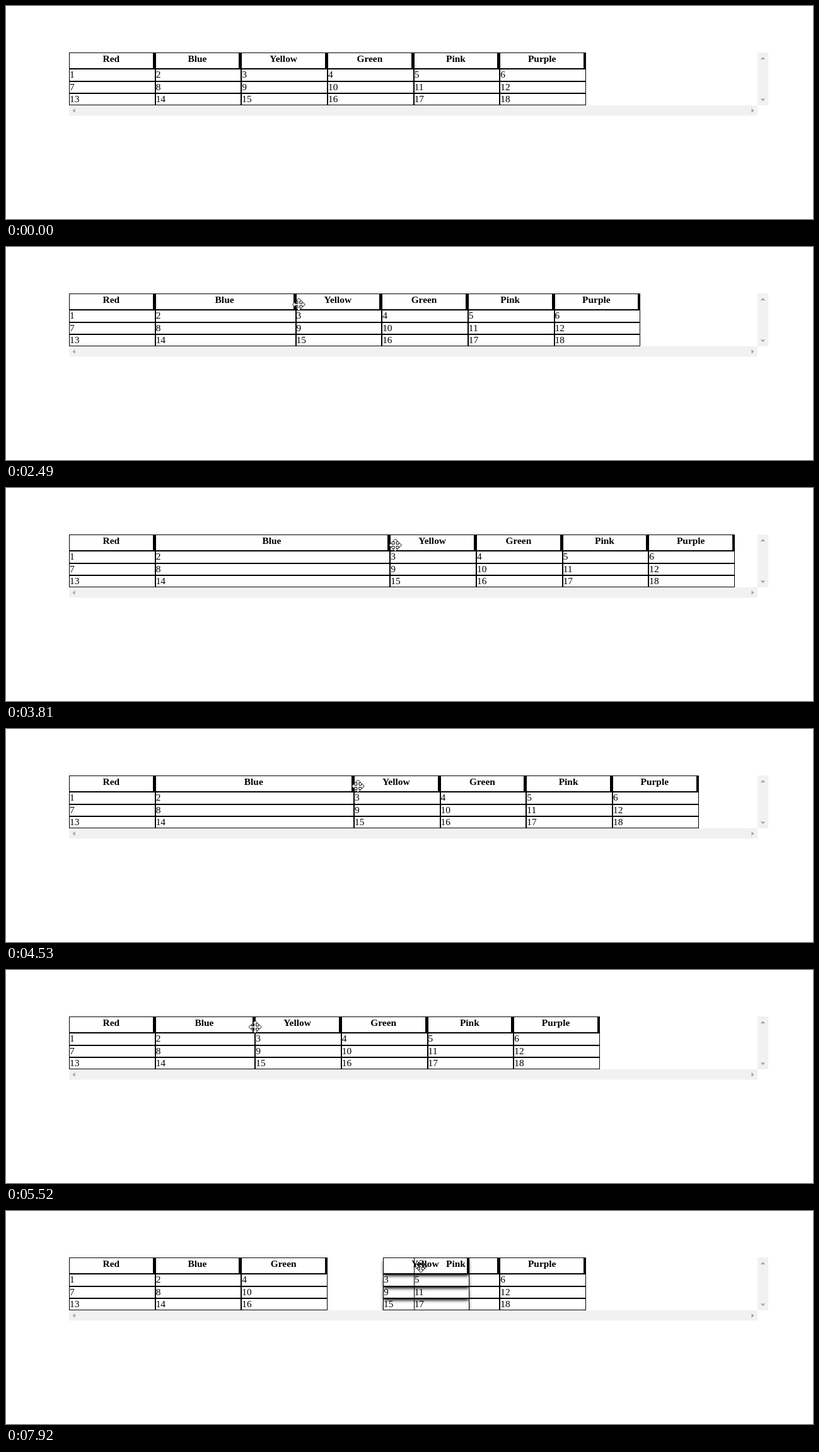
Write an HTML page that moves like this. It is 1280 by 339 pixels and loops after 8 s.

```html
<!DOCTYPE html>
<html lang="en">
<head>
<meta charset="utf-8">
<title>Resizable, sortable columns</title>
<style>
  html, body { margin: 0; width: 100%; height: 100%; overflow: hidden; background: #fff; }
  #view {
    position: absolute; left: 100px; top: 74px; width: 1092px; height: 84px; overflow: hidden;
    font: 15.4px/16px "Liberation Serif", "Times New Roman", serif; color: #000;
  }
  .col { position: absolute; top: 0; height: 84px; }
  .cell {
    position: absolute; left: 0; width: 100%; height: 19.2px;
    box-sizing: border-box; border: 1px solid #000; white-space: nowrap;
  }
  .head {
    top: 0; height: 26.4px; padding-top: .5px; border-right-width: 4px;
    font-weight: bold; text-align: center;
  }
  .dragged { z-index: 1; }
  .dragged .cell { box-shadow: 0 4px 5px -1px #000; }
  svg { position: absolute; left: 0; top: 0; }
</style>
</head>
<body>
<div id="view"></div>
<svg width="1280" height="339" viewBox="0 0 1280 339">
  <path fill="#f1f1f1" d="M1192 74h17v84h-17zM100 158h1092v16.5h-1092z"/>
  <path fill="#a3a3a3" d="M1197 85l3.5-4 3.5 4zM1197 147.500l3.5 4 3.500-4zM109.500 163v7l-4-3.500zM1182.500 163v7l4-3.500z"/>
  <g id="cursor">
    <path id="arrow" fill="#fff" stroke="#000" d="M.5.5V16.500L4.200 13 6.700 18.500 9 17.500 6.600 12H11.500Z"/>
    <path id="move" fill="#fff" stroke="#000" d="M0-10L4.500-5.500H1.500V-1.500H5.500V-4.500L10 0 5.500 4.500V1.500H1.500V5.500H4.500L0 10-4.500 5.500H-1.500V1.500H-5.500V4.500L-10 0-5.500-4.500V-1.500H-1.500V-5.500H-4.500Z"/>
    <g id="resize">
      <rect x="-2.5" y="-8" width="4.500" height="16" fill="#888" stroke="#222"/>
      <path fill="none" stroke="#000" stroke-width="1.300" d="M-4 0H-9.500M-6.500-3L-9.500 0-6.500 3M3.500 0H9M6-3L9 0 6 3"/>
    </g>
  </g>
</svg>
<script>
const LOOP = 8000;
const COL = 820 / 6;
const ROW = 19.2;
const HEAD = 26.4;
const names = ['Red', 'Blue', 'Yellow', 'Green', 'Pink', 'Purple'];
const SWAP_TIME = 7060;

// Each move runs in equal steps from start to end; path lists cursor points,
// grow is the extra width of Blue, drag the offset of Yellow.
const moves = [
  { start: 70, end: 840, steps: 11, path: [[600, 190], [284.5, 83.5], [364.5, 89.5]] },
  { start: 920, end: 1160, steps: 4, path: [[373.5, 96.5]] },
  { start: 1620, path: [[372, 89.3]], kind: 'resize' },
  { start: 1770, path: [[370, 89.3]], kind: 'resize' },
  { start: 2090, end: 2880, steps: 11, path: [[543, 93.5]], grow: 158 },
  { start: 2950, end: 3730, steps: 11, path: [[613, 91]], grow: 234, ease: 1.7 },
  { start: 3810, path: [[617.5, 91]], grow: 236 },
  { start: 4050, end: 4120, steps: 2, path: [[619, 91]], grow: 238 },
  { start: 4370, end: 5170, steps: 11, path: [[428, 91]], grow: 51, ease: 1.2 },
  { start: 5260, end: 5740, steps: 7, path: [[370.5, 90.5]], grow: 0 },
  { start: 5970, end: 6200, steps: 4, path: [[405, 100], [438.5, 88]] },
  { start: 6430, end: 6830, steps: 6, path: [[537, 88]], drag: 94 },
  { start: SWAP_TIME, path: [[532.5, 94.5]], drag: 0 },
  { start: 7360, end: 7530, steps: 3, path: [[567.5, 86.5]] },
  { start: 7680, end: 7920, steps: 4, path: [[658, 88]], drag: 88 }
];

const byId = id => document.getElementById(id);
const mix = (a, b, p) => a + (b - a) * p;

function addCell(col, text, className) {
  const cell = document.createElement('div');
  cell.className = className;
  cell.textContent = text;
  col.append(cell);
  return cell;
}

const cols = names.map((name, i) => {
  const col = document.createElement('div');
  col.className = 'col';
  addCell(col, name, 'cell head');
  for (let r = 0; r < 3; r++) {
    addCell(col, r * 6 + i + 1, 'cell').style.top = HEAD + r * ROW + 'px';
  }
  byId('view').append(col);
  return col;
});

function along(points, p) {
  const pos = p * (points.length - 1);
  const i = Math.min(Math.floor(pos), points.length - 2);
  return [0, 1].map(axis => mix(points[i][axis], points[i + 1][axis], pos - i));
}

function stateAt(t) {
  const s = { at: [990, 333], grow: 0, drag: 0, kind: '' };
  for (const m of moves) {
    if (t < m.start) break;
    const { end = m.start, steps = 1, ease = 1 } = m;
    const gap = (end - m.start) / (steps - 1) || 1;
    const step = Math.min(steps, Math.floor((t - m.start + 20) / gap) + 1);
    const p = 1 - (1 - step / steps) ** ease;
    s.at = along([s.at, ...m.path], p);
    s.grow = mix(s.grow, m.grow ?? s.grow, p);
    s.drag = mix(s.drag, m.drag ?? s.drag, p);
    s.kind = m.kind || (s.at[1] < 100 ? 'move' : 'arrow');
  }
  return s;
}

function render(t) {
  const { at, grow, drag, kind } = stateAt(t);
  const order = t < SWAP_TIME ? [0, 1, 2, 3, 4, 5] : [0, 1, 3, 2, 4, 5];
  order.forEach((index, slot) => {
    const style = cols[index].style;
    style.left = slot * COL + (slot > 1 ? grow : 0) + (index === 2 ? drag : 0) + 'px';
    style.width = COL + (index === 1 ? grow : 0) + 'px';
  });
  cols[2].classList.toggle('dragged', drag > 0);
  byId('cursor').setAttribute('transform', `translate(${at})`);
  for (const id of ['arrow', 'move', 'resize']) {
    byId(id).style.display = id === kind ? '' : 'none';
  }
}

const began = performance.now();
function tick() {
  render((performance.now() - began) % LOOP);
  requestAnimationFrame(tick);
}
render(0);
requestAnimationFrame(tick);
</script>
</body>
</html>
```
